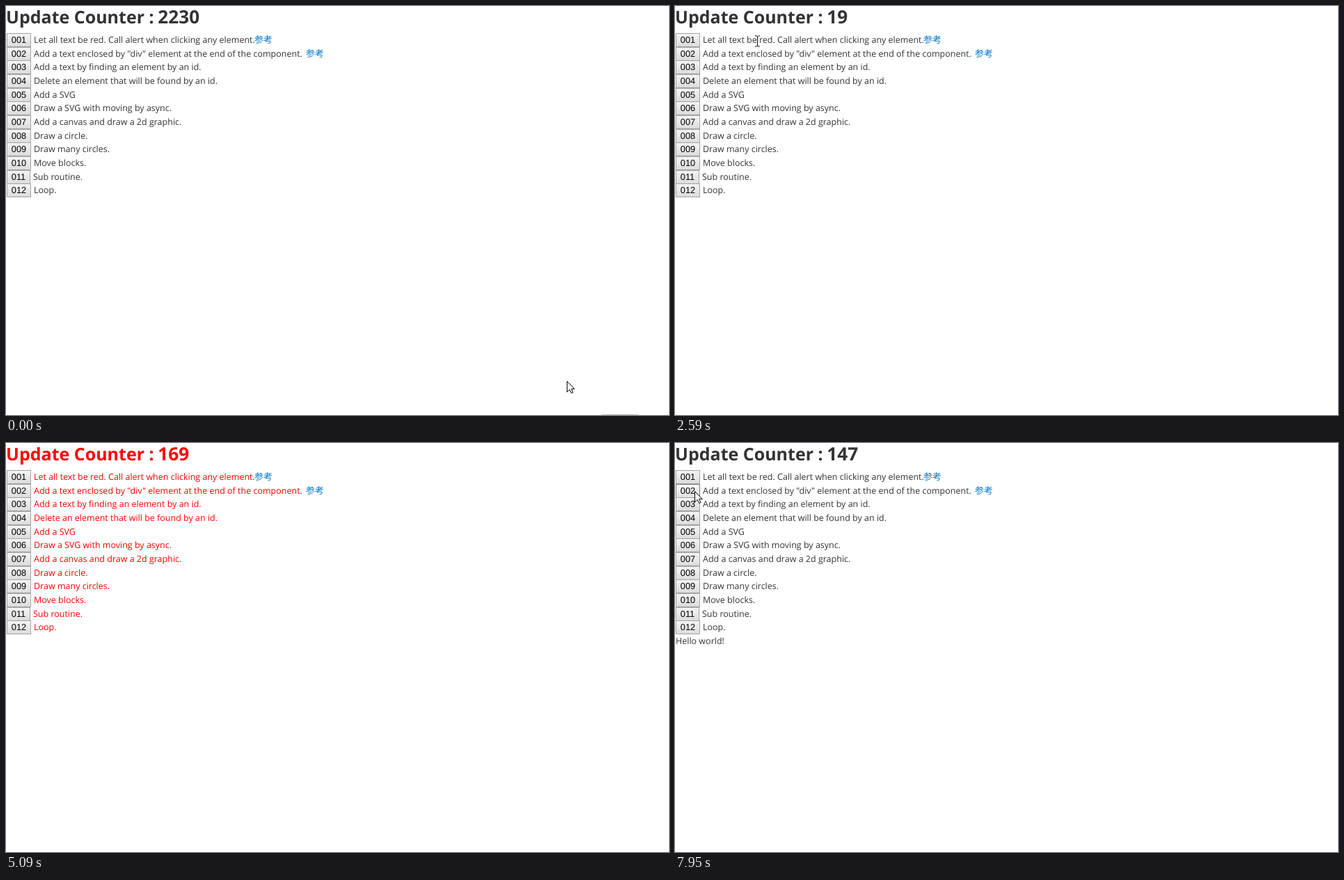
Animation, 953 px wide and 588 px high, one loop 8 s. Source, as an HTML page:

```html
<!DOCTYPE html>
<html lang="en">
<head>
<meta charset="utf-8">
<title>Update Counter</title>
<style>
html, body { margin: 0; width: 100%; height: 100%; overflow: hidden; background: #fff; }
svg { display: block; text-rendering: geometricPrecision; }
text { font: 12.5px "Open Sans", sans-serif; fill: #333; }
text.title { font-weight: 700; font-size: 25px; }
text.count { font-weight: 700; font-size: 26.2px; }
.red text { fill: #f00; }
text.link, .red text.link { font: 13px "Noto Sans CJK JP", "Noto Sans CJK", sans-serif; fill: #07c; }
text.num, .red text.num { font: 12.8px "Liberation Sans", Arial, sans-serif; fill: #000; text-anchor: middle; }
rect { fill: url(#face); stroke: #a3a3a3; }
rect.hover { fill: url(#faceHover); stroke: #7c7c7c; }
</style>
</head>
<body>
<svg id="stage" width="953" height="588" viewBox="0 0 953 588">
  <defs>
    <linearGradient id="face" x2="0" y2="1">
      <stop offset="0" stop-color="#f5f5f5"/><stop offset="1" stop-color="#dcdcdc"/>
    </linearGradient>
    <linearGradient id="faceHover" x2="0" y2="1">
      <stop offset="0" stop-color="#f8f8f8"/><stop offset="1" stop-color="#e0e0e0"/>
    </linearGradient>
  </defs>
  <g id="page">
    <text class="title" x="0" y="25">Update Counter :</text>
    <text class="count" id="count" x="218.3" y="25"></text>
    <g id="rows"></g>
    <text id="hello" x="1" y="289">Hello world!</text>
  </g>
  <path id="dots" d="M857 587.5H909" stroke="#6f7f90" stroke-dasharray="1 1"/>
  <path id="arrow" d="M.5 .5V16L4.2 12.5 6.6 17.5 9 16.5 6.7 11.5H11.2Z" fill="#fff" stroke="#000"/>
  <path id="beam" d="M-3.5 -7.5H-1L0 -6.5 1 -7.5H3.5M0 -6.5V6.5M-3.5 7.5H-1L0 6.5 1 7.5H3.5" fill="none" stroke="#000"/>
</svg>
<script>
const LOOP = 8000, PITCH = 19.67;
const RELOADS = [2260, 5500], CLICKS = [4050, 7300];
const labels = [
  'Let all text be red. Call alert when clicking any element.',
  'Add a text enclosed by "div" element at the end of the component.',
  'Add a text by finding an element by an id.',
  'Delete an element that will be found by an id.',
  'Add a SVG',
  'Draw a SVG with moving by async.',
  'Add a canvas and draw a 2d graphic.',
  'Draw a circle.',
  'Draw many circles.',
  'Move blocks.',
  'Sub routine.',
  'Loop.'
];
const linkX = [357, 431];

// Screen refreshes: [first, last, number of steps]
const steps = [0, ...[
  [70, 810, 11], [890, 1670, 11], [1750, 2530, 11], [2590, 3380, 11], [3470, 4230, 11],
  [4300, 5090, 11], [5170, 5940, 11], [6010, 6780, 11], [6860, 7640, 11], [7710, 7950, 4]
].flatMap(([a, b, n]) => Array.from({ length: n }, (_, i) => a + (b - a) * i / (n - 1)))];

// Pointer visits as [time, x, y]; hidden outside each visit
const visits = [
  [[0, 806, 539], [170, 806, 539], [770, 104, 2], [800, 104, 2]],
  [[2440, 96, 12], [2590, 118.5, 50.5], [2700, 118.5, 50.5], [3250, 70, 55], [3470, 66, 53],
   [3750, 22, 46], [4550, 22, 46], [4660, 40, 22]],
  [[6090, 64, 24], [6340, 32, 84], [6620, 28, 69], [8000, 28, 69]]
];

const el = id => document.getElementById(id);
const page = el('page'), count = el('count'), hello = el('hello'), dots = el('dots');
const arrow = el('arrow'), beam = el('beam');

function add(tag, attrs, text = '') {
  const node = document.createElementNS('http://www.w3.org/2000/svg', tag);
  for (const name in attrs) node.setAttribute(name, attrs[name]);
  node.textContent = text;
  return el('rows').appendChild(node);
}

const buttons = labels.map((label, i) => {
  const dy = Math.round(i * PITCH), y = 53 + dy;
  const width = i === 10 ? 33 : 34;
  const button = add('rect', { x: 1.5, y: 39.5 + dy, width, height: 19 });
  add('text', { class: 'num', x: 1.5 + width / 2, y }, String(i + 1).padStart(3, '0'));
  add('text', { x: width + 6, y }, label);
  if (linkX[i]) add('text', { class: 'link', x: linkX[i], y }, '参考');
  return button;
});

const show = (node, on) => { node.style.display = on ? '' : 'none'; };

function pointerAt(t) {
  const path = visits.find(v => t >= v[0][0] && t <= v[v.length - 1][0]);
  if (!path) return null;
  const i = Math.max(1, path.findIndex(p => p[0] >= t));
  const [t0, x0, y0] = path[i - 1], [t1, x1, y1] = path[i];
  const u = (t - t0) / (t1 - t0), ease = u * u * (3 - 2 * u);
  return [x0 + (x1 - x0) * ease, y0 + (y1 - y0) * ease];
}

function counterAt(t) {
  const start = t < RELOADS[0] ? 2230 : t < RELOADS[1] ? 19.1 - 2590 * .06 : 72.3 - 6703 * .06;
  return Math.max(0, Math.floor(start + t * .06));
}

function draw(time) {
  const t = steps.filter(s => s <= time + 10).pop();
  count.textContent = counterAt(t);
  show(page, t < RELOADS[0] || t > RELOADS[0] + 80);
  page.classList.toggle('red', t > CLICKS[0] && t < RELOADS[1]);
  show(hello, t > CLICKS[1]);
  show(dots, t < 2000);

  const at = pointerAt(t);
  const overText = at && at[0] > 38 && at[1] > 41 && at[1] < 60;
  show(arrow, at && !overText);
  show(beam, overText);
  if (at) {
    const [x, y] = at.map(Math.floor);
    arrow.setAttribute('transform', `translate(${x} ${y})`);
    beam.setAttribute('transform', `translate(${x + .5} ${y + .5})`);
  }
  buttons.forEach((button, i) => {
    const top = 39 + i * PITCH;
    const over = at && at[0] < 36 && at[1] >= top && at[1] < top + PITCH;
    button.classList.toggle('hover', Boolean(over));
  });
}

const began = performance.now();
function tick() {
  draw((performance.now() - began) % LOOP);
  requestAnimationFrame(tick);
}
tick();
</script>
</body>
</html>
```
